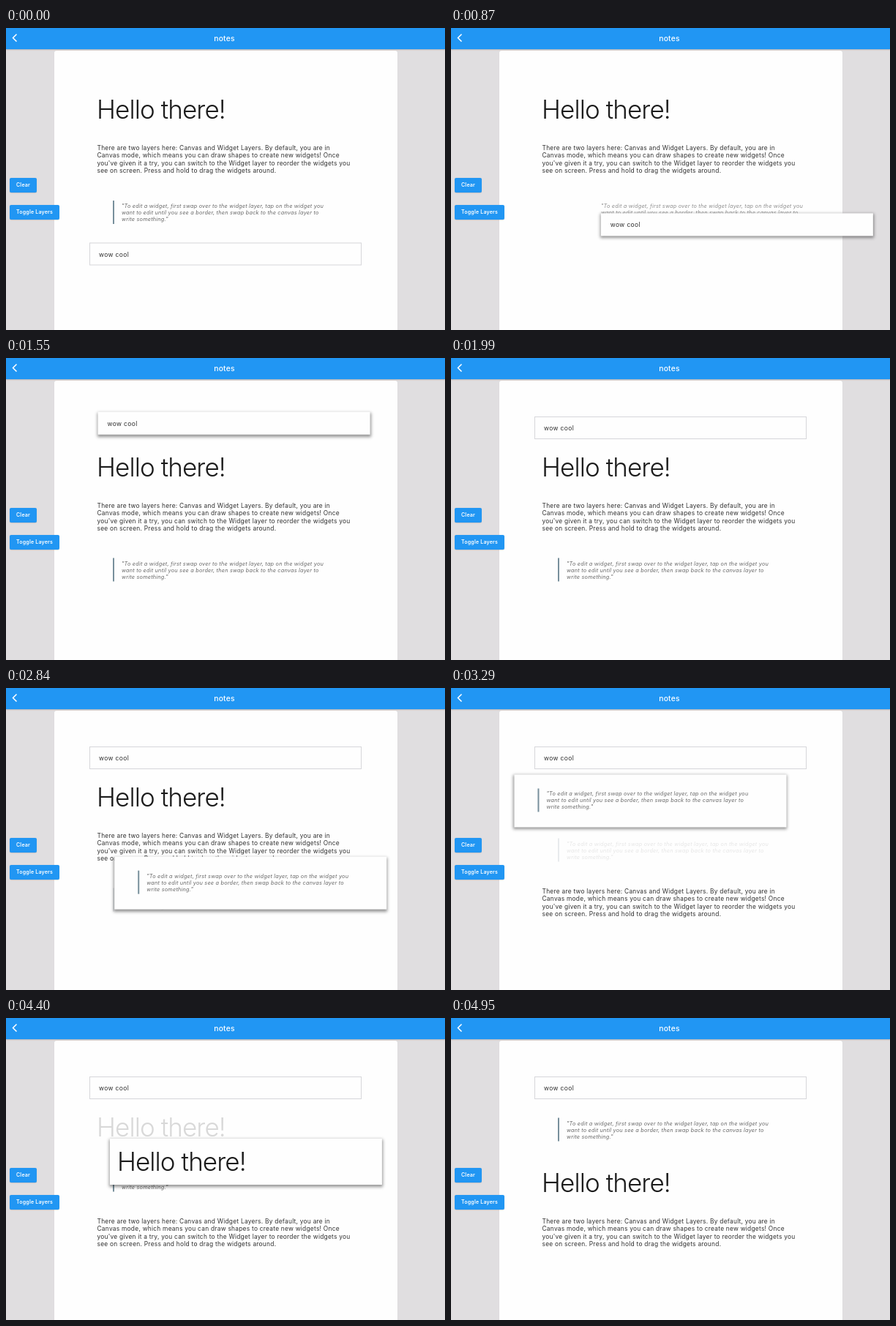
These frames come from a looping animation (600x413 px, 4970 ms). An HTML page:

```html
<!DOCTYPE html>
<html lang="en">
<head>
<meta charset="utf-8">
<title>notes</title>
<style>
  html, body { margin: 0; width: 100%; height: 100%; overflow: hidden; }
  body { position: relative; background: #e0dee0; font-family: Inter, Roboto, sans-serif; white-space: nowrap; }
  header, .page, .btn, .item, .item > * { position: absolute; box-sizing: border-box; }
  header {
    left: 0; top: 0; width: 600px; height: 28.5px; z-index: 4; background: #2196f3; color: #fff;
    box-shadow: 0 1px 1.5px rgba(0,0,0,.2); text-align: center; line-height: 28px;
    font-size: 10.3px; font-weight: 500; letter-spacing: .2px; text-indent: -3px;
  }
  header svg { position: absolute; left: 0; top: 0; }
  .page { left: 65.5px; top: 30.5px; width: 469px; height: 400px; background: #fefefe; border-radius: 3px; box-shadow: 0 0 1px rgba(0,0,0,.08); }
  .btn {
    left: 5px; height: 20px; z-index: 2; border-radius: 2px; background: #2196f3; color: #fff;
    padding-left: 9px; font-size: 7px; font-weight: 600; line-height: 20px; letter-spacing: .2px;
    box-shadow: 0 .5px 1px rgba(0,0,0,.22);
  }
  .item { left: 113.5px; top: 0; width: 372.5px; color: #303030; }
  .lift { z-index: 3; background: #fefefe; box-shadow: 0 2px 4px 1px rgba(0,0,0,.42); }
  .ghost { opacity: .16; }
  .hello { height: 63px; }
  .hello p { left: 10.5px; line-height: 62px; font-size: 35px; font-weight: 300; letter-spacing: -.9px; color: #1c1c1c; }
  .para { height: 62px; }
  .para p { left: 11px; top: 9.9px; line-height: 10.4px; font-size: 8.4px; letter-spacing: .247px; }
  .quote { height: 72px; }
  .quote p { left: 44.5px; top: 21.5px; line-height: 9.4px; font-size: 7.3px; font-style: italic; letter-spacing: .22px; color: #686868; }
  .quote i { left: 32.5px; top: 18.5px; width: 1.5px; height: 32.5px; background: #78909c; }
  .stale { opacity: .75; }
  .stale i { display: none; }
  .cool { height: 31px; border: 1px solid #d6d6da; }
  .cool.lift, .cool.ghost { border-color: transparent; }
  .cool p { left: 12.5px; line-height: 30px; font-size: 8.5px; letter-spacing: .36px; }
  p { margin: 0; }
</style>
</head>
<body>
<header>notes
  <svg width="30" height="28"><path d="M14.5 8.5 9.5 13.5 14.5 18.5" fill="none" stroke="#fff" stroke-width="1.5"/></svg>
</header>
<div class="page"></div>
<div class="item hello"><p>Hello there!</p></div>
<div class="item para"><p>There are two layers here: Canvas and Widget Layers. By default, you are in<br>Canvas mode, which means you can draw shapes to create new widgets! Once<br>you've given it a try, you can switch to the Widget layer to reorder the widgets you<br>see on screen. Press and hold to drag the widgets around.</p></div>
<div class="item quote"><i></i><p>"To edit a widget, first swap over to the widget layer, tap on the widget you<br>want to edit until you see a border, then swap back to the canvas layer to<br>write something."</p></div>
<div class="item cool"><p>wow cool</p></div>
<div class="btn" style="top:205px;width:37px">Clear</div>
<div class="btn" style="top:242px;width:68px">Toggle Layers</div>
<script>
const LOOP = 4970, SHIFT = 110, TOP = 80;
const heights = { h: 69, p: 68, q: 76.5, c: 37.5 };
const names = { h: 'hello', p: 'para', q: 'quote', c: 'cool' };

// Time at which each list order takes hold.
const orders = [
  [-999, 'hpqc'], [230, 'hqpc'], [390, 'hpqc'], [500, 'hpcq'],
  [1010, 'hcpq'], [1290, 'chpq'], [2900, 'chqp'], [4420, 'cqhp']
];

// Each drag: item, then [time, x offset, y] along its path.
const drags = [
  ['q', [[40, 0, 217], [200, 30, 185], [360, 47, 217], [550, -142, 293], [690, 0, 254.5]]],
  ['c', [[730, 0, 217], [870, 90.5, 253.5], [1010, 100, 180], [1110, 70, 125], [1210, 32, 90],
         [1500, 14, 74], [1900, 0, 80]]],
  ['q', [[2150, 0, 254.5], [2480, 30, 266], [2800, 38, 238], [3060, -4, 176], [3290, -27.5, 118.5],
         [3500, -20, 146], [3720, 0, 186.5]]],
  ['h', [[3850, 0, 117.5], [4160, 7.5, 119], [4350, 28, 152], [4560, 18, 204], [4780, 0, 194]]]
];
const stale = { from: 840, to: 900, x: 47, y: 217 };

const items = {}, ghosts = {};
for (const k in names) {
  items[k] = document.querySelector('.' + names[k]);
  ghosts[k] = items[k].cloneNode(true);
  ghosts[k].classList.add('ghost');
  items[k].before(ghosts[k]);
}

const slotTop = (order, k) =>
  [...order.slice(0, order.indexOf(k))].reduce((y, o) => y + heights[o], TOP);
const ease = u => u * u * (3 - 2 * u);

function slotAt(t, k) {
  let i = orders.length - 1;
  while (orders[i][0] > t) i--;
  const now = slotTop(orders[i][1], k);
  if (!i) return now;
  const old = slotTop(orders[i - 1][1], k);
  return old + (now - old) * ease(Math.min(1, (t - orders[i][0]) / SHIFT));
}

// Smooth curve through the path's points, at rest at both ends.
function along(path, t) {
  let i = 0;
  while (i < path.length - 2 && path[i + 1][0] <= t) i++;
  const a = path[i], b = path[i + 1], span = b[0] - a[0], u = (t - a[0]) / span;
  const slope = (j, d) => path[j - 1] && path[j + 1]
    ? (path[j + 1][d] - path[j - 1][d]) / (path[j + 1][0] - path[j - 1][0]) : 0;
  return [1, 2].map(d =>
    a[d] + (b[d] - a[d]) * ease(u) +
    span * u * (1 - u) * ((1 - u) * slope(i, d) - u * slope(i + 1, d)));
}

const place = (el, x, y) => { el.style.transform = `translate(${x}px,${y}px)`; };

function draw(t) {
  const drag = drags.find(([, path]) => t >= path[0][0] && t < path[path.length - 1][0]);
  const isStale = t >= stale.from && t < stale.to;
  for (const k in items) {
    const held = !!drag && drag[0] === k, y = slotAt(t, k);
    items[k].classList.toggle('lift', held);
    ghosts[k].style.display = held && !isStale ? '' : 'none';
    place(ghosts[k], 0, y);
    place(items[k], ...(held ? along(drag[1], t) : [0, y]));
  }
  items.q.classList.toggle('stale', isStale);
  if (isStale) place(items.q, stale.x, stale.y);
}

const start = performance.now();
function tick() {
  draw((performance.now() - start) % LOOP);
  requestAnimationFrame(tick);
}
tick();
</script>
</body>
</html>
```
